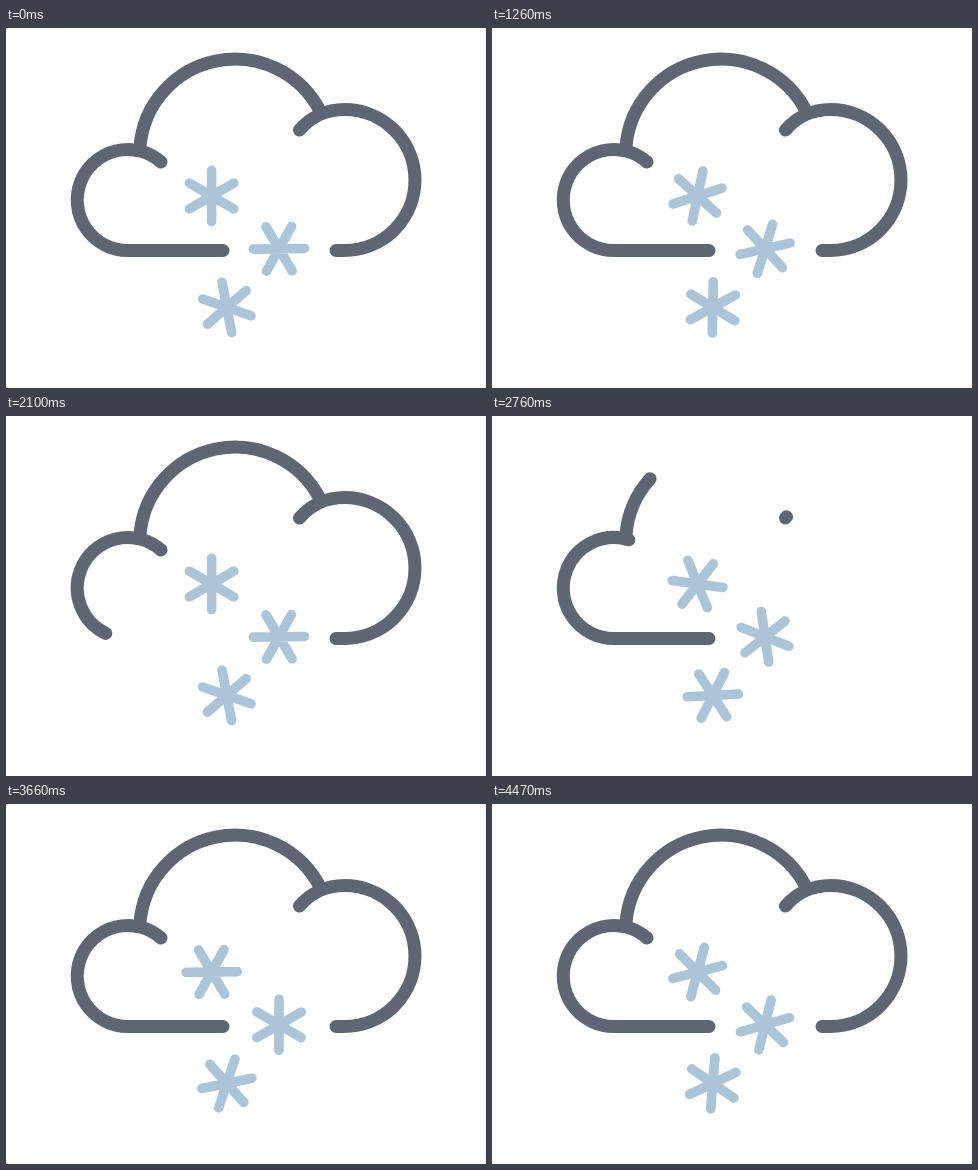
These frames come from a looping animation (480 by 360 pixels, 4.5 s). An HTML page:

```html
<!DOCTYPE html>
<html lang="en">
<head>
<meta charset="utf-8">
<title>Snow cloud</title>
<style>
  html, body { margin: 0; width: 100%; height: 100%; overflow: hidden; background: #fff; }
  svg { display: block; width: 100vw; height: 100vh; }
  path { fill: none; stroke-linecap: round; stroke-linejoin: round; }
  #cloud path { stroke: #5d6672; stroke-width: 13; }
  #flakes path { stroke: #abc4d8; stroke-width: 9.6; }
</style>
</head>
<body>
<svg viewBox="0 0 480 360">
  <g id="cloud"></g>
  <g id="flakes"></g>
</svg>
<script>
const LOOP = 4500;
const SPIN = 360 / 6300;          // degrees per ms
const ERASE = 1890, DRAW = 2385;  // start of each phase for the first stroke
const ERASE_MS = 480, DRAW_MS = 450;

const strokes = [
  { d: "M217 222.5H121.5A50.5 50.5 0 1 1 155 134", delay: 0 },
  { d: "M134 118.5A95.4 95.4 0 0 1 314 83", delay: 228 },
  { d: "M293.5 102C304 89.5 320 81.5 338.5 81.5A70.5 70.5 0 0 1 338.5 222.5H330", delay: 355 }
];

const flakes = [
  { x: 205.6, y: 168, angle: 0, dir: 1 },
  { x: 273, y: 220.8, angle: 29.3, dir: -1 },
  { x: 220.8, y: 279.4, angle: 49.2, dir: 1 }
];

function addPath(parent, d) {
  const el = document.createElementNS("http://www.w3.org/2000/svg", "path");
  el.setAttribute("d", d);
  document.getElementById(parent).appendChild(el);
  return el;
}

function flakeShape(r) {
  return [0, 60, 120].map(deg => {
    const a = deg * Math.PI / 180;
    const x = r * Math.sin(a), y = r * Math.cos(a);
    return `M${x} ${y}L${-x} ${-y}`;
  }).join("");
}

for (const s of strokes) {
  s.el = addPath("cloud", s.d);
  s.len = s.el.getTotalLength();
}
for (const f of flakes) f.el = addPath("flakes", flakeShape(25.6));

function ease(u) {
  u = Math.min(1, Math.max(0, u));
  return u * u * (3 - 2 * u);
}

// Show only the part of a stroke between two fractions of its length.
function trim(s, from, to) {
  const style = s.el.style;
  style.visibility = to > from ? "visible" : "hidden";
  if (from === 0 && to === 1) {
    style.strokeDasharray = "none";
    return;
  }
  style.strokeDasharray = `${(to - from) * s.len} ${2 * s.len}`;
  style.strokeDashoffset = -from * s.len;
}

function render(t) {
  for (const s of strokes) {
    const local = t - s.delay;
    if (local < DRAW) trim(s, ease((local - ERASE) / ERASE_MS), 1);
    else trim(s, 0, ease((local - DRAW) / DRAW_MS));
  }
  for (const f of flakes) {
    const turn = f.angle + f.dir * SPIN * t;
    f.el.setAttribute("transform", `translate(${f.x} ${f.y}) rotate(${turn})`);
  }
}

let start;
function tick(now) {
  if (start === undefined) start = now;
  render((now - start) % LOOP);
  requestAnimationFrame(tick);
}
render(0);
requestAnimationFrame(tick);
</script>
</body>
</html>
```
